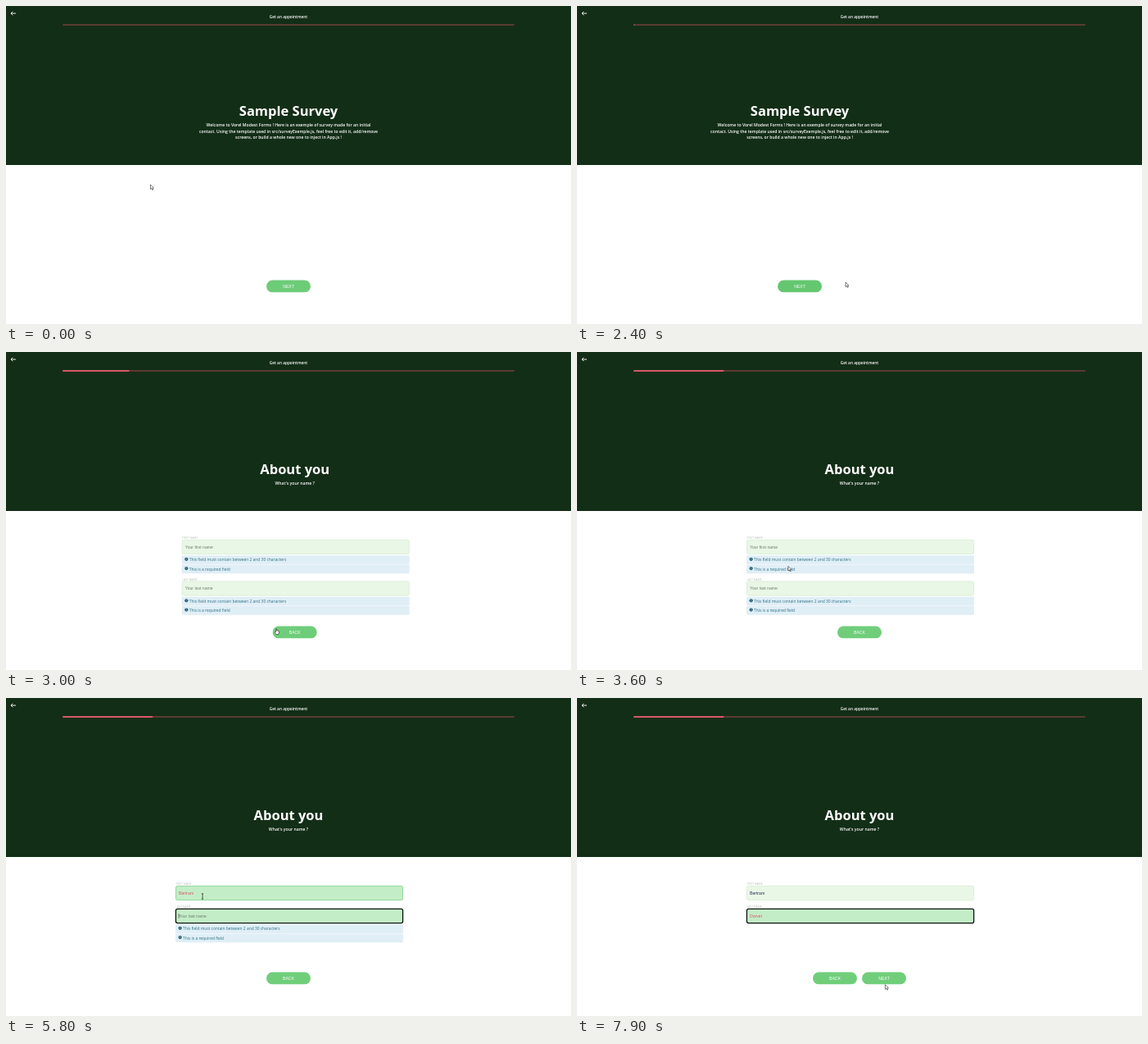
An HTML page for the animation above (8 s loop, 690 by 388 pixels).

```html
<!DOCTYPE html>
<html lang="en">
<head>
<meta charset="utf-8">
<title>Survey</title>
<style>
  html, body { margin: 0; width: 100%; height: 100%; overflow: hidden; background: #fff; }
  svg { display: block; width: 690px; height: 388px; }
  text { font-family: "Open Sans", "Noto Sans", sans-serif; white-space: pre; }
  .mid { text-anchor: middle; }
  .title { font-size: 16.5px; font-weight: 700; fill: #fff; }
  .lead { font-size: 5.12px; font-weight: 600; fill: #fff; }
  .head { font-size: 4.78px; font-weight: 600; fill: #fff; }
  .label { font-size: 3.4px; fill: #b9c1b9; }
  .hint { font-size: 4.9px; fill: #2b7086; }
  .input, .button { font-family: "Liberation Sans", Arial, sans-serif; font-size: 5.12px; }
  .button { fill: #fff; }
</style>
</head>
<body>
<svg id="stage" viewBox="0 0 690 388"></svg>
<script>
const LOOP = 8000, STEP = 100, WIDTH = 690;
const stage = document.getElementById('stage');

function el(parent, tag, attrs = {}, text) {
  const node = document.createElementNS('http://www.w3.org/2000/svg', tag);
  set(node, attrs);
  if (text !== undefined) node.textContent = text;
  return parent.appendChild(node);
}
function set(node, attrs) {
  for (const key in attrs) node.setAttribute(key, attrs[key]);
}
const show = (node, on) => set(node, { visibility: on ? 'inherit' : 'hidden' });
const move = (node, x, y) => set(node, { transform: `translate(${x} ${y})` });
const label = (parent, cls, x, y, text) => el(parent, 'text', { class: cls, x, y }, text);

const ramp = (t, from, to) => Math.min(1, Math.max(0, (t - from) / (to - from)));
// Rises at `on`, falls at `off`, each over `d` ms
const pulse = (t, on, off, d) => ramp(t, on, on + d) * (1 - ramp(t, off, off + d));

function mix(a, b, k) {
  const c = a.map((v, i) => Math.round(v + (b[i] - v) * k));
  return `rgb(${c})`;
}

function bezier(x1, y1, x2, y2) {
  const at = (a, b, s) => 3 * a * s * (1 - s) ** 2 + 3 * b * s * s * (1 - s) + s ** 3;
  return x => {
    let lo = 0, hi = 1;
    for (let i = 0; i < 30; i++) {
      const m = (lo + hi) / 2;
      if (at(x1, x2, m) < x) lo = m; else hi = m;
    }
    return at(y1, y2, (lo + hi) / 2);
  };
}
const ease = bezier(.25, .1, .25, 1);
const easeInOut = bezier(.42, 0, .58, 1);

const GREEN = [112, 206, 123], GREEN_HOVER = [100, 199, 112];
const PALE = [233, 247, 230], ACTIVE = [195, 237, 199];
const EDGE = [212, 236, 208], EDGE_HOVER = [126, 207, 134], BLACK = [8, 20, 10];
const NAVY = [32, 46, 92], PINK = [217, 88, 104];

// Header and progress bar
el(stage, 'rect', { width: WIDTH, height: 388, fill: '#fff' });
el(stage, 'rect', { width: WIDTH, height: 194, fill: '#132e17' });
el(stage, 'path', { d: 'M12 9H6M8.3 6.8L6 9l2.3 2.2', fill: 'none', stroke: '#fff', 'stroke-width': .9 });
label(stage, 'head mid', 345, 14.8, 'Get an appointment');
el(stage, 'rect', { x: 69, y: 22, width: 552, height: 2, rx: 1, fill: '#5b3a31' });
const bar = el(stage, 'rect', { x: 69, y: 22, width: 0, height: 2, rx: 1, fill: '#d9576a' });

function makeButton(parent, text) {
  const g = el(parent, 'g');
  const box = el(g, 'rect', { x: -27, y: 334.5, width: 54, height: 14.8, rx: 7.4 });
  label(g, 'button mid', 0, 343.8, text);
  return {
    g,
    draw(x, hover) {
      move(g, x, 0);
      set(box, { fill: mix(GREEN, GREEN_HOVER, hover) });
    }
  };
}

// Welcome page
const welcome = el(stage, 'g');
label(welcome, 'title mid', 345, 134.2, 'Sample Survey');
[
  'Welcome to Vorel Modest Forms ! Here is an exemple of survey made for an initial',
  'contact. Using the template used in src/surveyExemple.js, feel free to edit it, add/remove',
  'screens, or build a whole new one to inject in App.js !'
].forEach((line, i) => label(welcome, 'lead mid', 345, 147.3 + i * 7.2, line));
const start = makeButton(welcome, 'NEXT');

// Name page
const about = el(stage, 'g');
label(about, 'title mid', 345, 148.7, 'About you');
label(about, 'lead mid', 345, 161.7, "What's your name ?");

function makeHint(parent, text) {
  const g = el(parent, 'g');
  el(g, 'rect', { x: 207, y: -5.3, width: 278, height: 10.6, rx: 1.2, fill: '#e0eef6' });
  el(g, 'circle', { cx: 212.6, cy: -.8, r: 2.1, fill: '#1d5d74' });
  el(g, 'path', { d: 'M212.6 -2v1.3M212.6 -.1v.5', stroke: '#e0eef6', 'stroke-width': .6 });
  label(g, 'hint', 216, 1.8, text);
  return g;
}

// Drawn around its own vertical centre
function makeField(name, value, keys) {
  const g = el(about, 'g');
  label(g, 'label', 207.5, -9.9, `${name} NAME`);
  const box = el(g, 'rect', { x: 207.4, y: -8.6, width: 277.2, height: 17.2, rx: 2 });
  const hold = label(g, 'input', 211, 1.9, `Your ${name.toLowerCase()} name`);
  set(hold, { fill: '#6f7f70' });
  const typed = label(g, 'input', 211, 1.9, '');
  const caret = el(g, 'rect', { y: -2.8, width: .6, height: 5.6, fill: '#333' });
  const range = makeHint(g, 'This field must contain between 2 and 30 characters');
  const required = makeHint(g, 'This is a required field');
  move(range, 0, 15.6);
  move(required, 0, 26.85);
  return {
    count: t => keys.filter(k => k <= t).length,
    hints: t => Math.max(0, 2 - keys.filter(k => k <= t).length),
    draw(t, y, focus, hover, caretOn) {
      const n = this.count(t), lit = Math.max(focus, hover);
      move(g, 0, y);
      const edge = EDGE.map((v, i) => v + (EDGE_HOVER[i] - v) * hover);
      set(box, {
        fill: mix(PALE, ACTIVE, lit),
        stroke: mix(edge, BLACK, focus),
        'stroke-width': .8 + .5 * focus
      });
      typed.textContent = value.slice(0, n);
      set(typed, { fill: mix(NAVY, PINK, lit) });
      set(caret, { x: 211 + (n ? typed.getComputedTextLength() : -.3) });
      show(hold, n === 0);
      show(caret, caretOn);
      show(range, n < 2);
      show(required, n < 1);
    }
  };
}
const first = makeField('First', 'Bertram', [4400, 4600, 4700, 4900, 5000, 5200, 5400]);
const last = makeField('Last', 'Dorvel', [6200, 6400, 6500, 6600, 6800, 6900]);
about.querySelectorAll('.label').forEach(n => n.textContent = n.textContent.toUpperCase());
const back = makeButton(about, 'BACK');
const next = makeButton(about, 'NEXT');

// Pointer shapes, tip at the origin
const ink = { fill: '#fff', stroke: '#222', 'stroke-width': .6, 'stroke-linejoin': 'round' };
const pointer = el(stage, 'g');
const shapes = {
  arrow: el(pointer, 'path', { ...ink, d: 'M.4 .4V6L1.7 4.9L2.7 7L3.7 6.5L2.8 4.5H4.4Z' }),
  hand: el(pointer, 'path', {
    ...ink,
    d: 'M2 4.8V1.2Q2.5 .3 3 1.2V3.3Q4.6 3.2 5.8 4.2V6.2L5 8H2.5L.7 5.5Q.8 4.4 2 4.8Z'
  }),
  beam: el(pointer, 'path', {
    d: 'M-1.2 -3.2H1.2M0 -3.2V3.2M-1.2 3.2H1.2', fill: 'none', stroke: '#222', 'stroke-width': .7
  })
};

const PATH = [
  [0, 176, 217.5], [500, 180, 221], [800, 180, 221], [900, 148, 190], [1100, 148, 190],
  [1200, 190, 222], [1400, 311.5, 298.8], [1700, 326, 330], [1900, 327.6, 336.6],
  [3200, 327.6, 336.6], [3700, 240, 242], [7400, 240, 242], [7500, 244, 251],
  [7600, 292, 302], [7700, 343, 345], [7800, 367, 353.5], [7900, 376, 349.3]
];
function pointAt(t) {
  const i = PATH.findIndex(p => p[0] > t);
  if (i < 0) return PATH[PATH.length - 1].slice(1);
  const a = PATH[i - 1], b = PATH[i], k = ramp(t, a[0], b[0]);
  return [a[1] + (b[1] - a[1]) * k, a[2] + (b[2] - a[2]) * k];
}

function render(t) {
  const slide = ease(ramp(t, 2315, 3110));
  const shift = WIDTH * (1 - slide);
  move(welcome, -WIDTH * slide, 0);
  move(about, shift, 0);
  show(welcome, slide < 1);
  show(about, slide > 0);
  set(bar, { width: 110.4 * easeInOut(ramp(t, 2340, 3360)) });

  const leaving = .25 * (1 - ramp(t, 0, 500));
  start.draw(345, Math.max(leaving, pulse(t, 1650, 2400, 250)));

  const y2 = 266 + 11.25 * first.hints(t);
  first.draw(t, 238, pulse(t, 3800, 5500, 300), pulse(t, 3650, 7400, 300), t >= 4000 && t < 5600);
  last.draw(t, y2, ramp(t, 5500, 5800), 0, t >= 5600 && t < 6900);

  const valid = first.count(t) > 1 && last.count(t) > 1;
  const backX = valid ? 315 : 345;
  back.draw(backX, pulse(t, 2950, 3300, 300));
  next.draw(375, 0);
  show(next.g, valid);

  const [x, y] = pointAt(t);
  const onRow = y > 334.5 && y < 349.2;
  const hit = cx => onRow && Math.abs(x - cx) < 27;
  const onButton = hit(345 - WIDTH * slide) || hit(backX + shift) || (valid && hit(375));
  const inField = cy => Math.abs(y - cy) < 8.8 && x > 207 + shift && x < 485 + shift;
  const kind = onButton ? 'hand' : inField(238) || inField(y2) ? 'beam' : 'arrow';
  for (const key in shapes) show(shapes[key], key === kind);
  move(pointer, x, y);
}

let origin;
function frame(now) {
  if (origin === undefined) origin = now;
  const t = (now - origin) % LOOP;
  render(Math.floor(t / STEP) * STEP);
  requestAnimationFrame(frame);
}
render(0);
requestAnimationFrame(frame);
</script>
</body>
</html>
```
